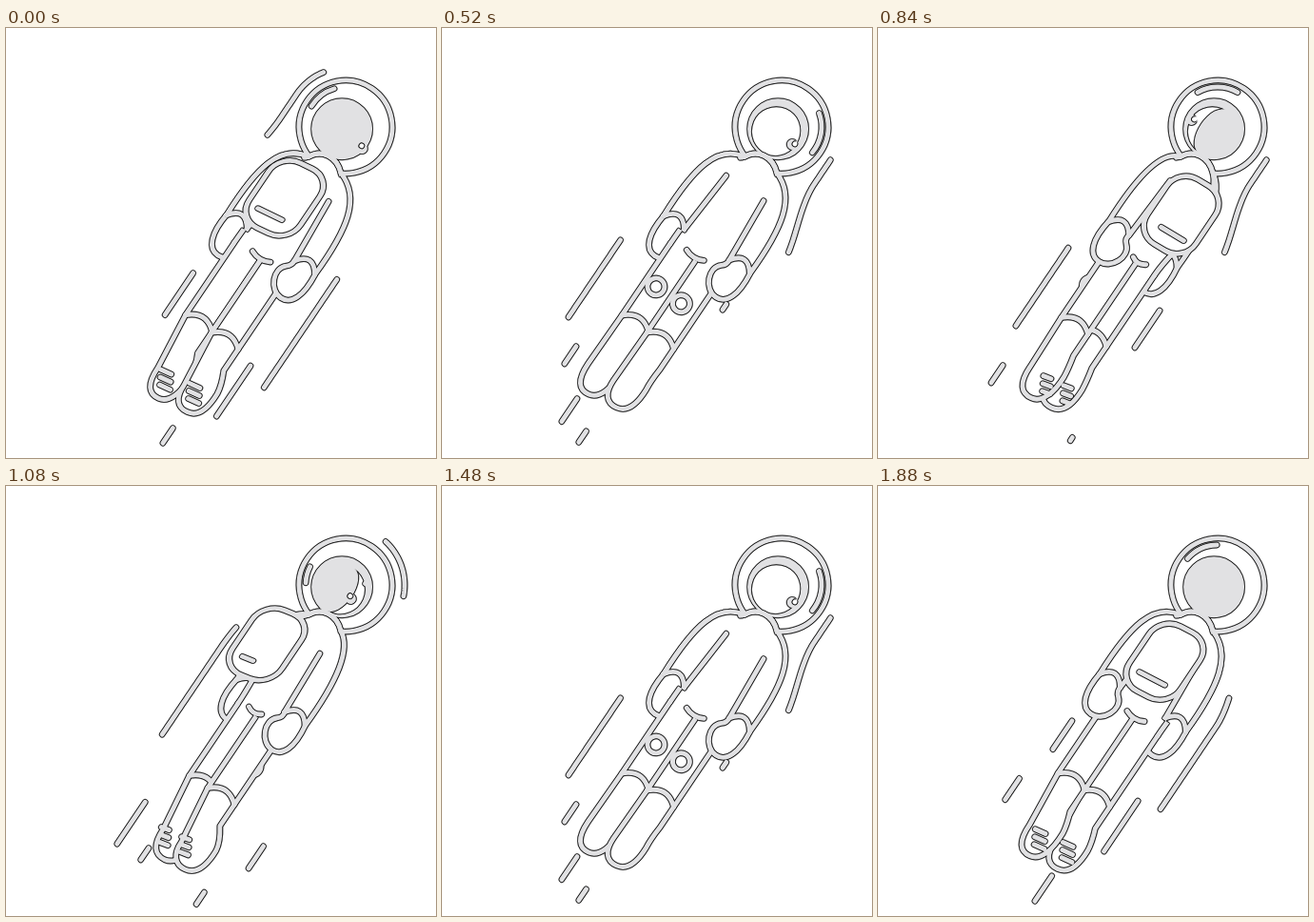
Write an HTML page with a canvas that moves like this. It is 452x452 px and loops after 1.92 s.

```html
<!DOCTYPE html>
<html lang="en">
<head>
<meta charset="utf-8">
<title>Spinning astronaut</title>
<style>
  html, body { margin: 0; width: 100%; height: 100%; overflow: hidden; background: #fff; }
  canvas { display: block; width: 452px; height: 452px; }
</style>
</head>
<body>
<canvas id="stage" width="452" height="452"></canvas>
<script>
const SIZE = 452, STEP = 40, TURN = 24, GREY = '#e1e1e3';
const RAD = Math.PI / 180;
const { sin, cos, abs, min, max } = Math;
const out = document.getElementById('stage').getContext('2d');
const layer = () => Object.assign(document.createElement('canvas'), { width: SIZE, height: SIZE }).getContext('2d');
const g = layer(), edge = layer();
const AXIS = 4;

// Streaks wrapping the helmet: side, phase, final distance, end, first step
const wraps = [
  [1, 5, 66, 304, -3], [1, 13, 82, 304, -3], [1, 21, 82, 304, -3],
  [-1, 0.8, 72, 288, -1], [-1, 8.8, 74, 291, -3], [-1, 16.8, 59, 322, -3]
];
// Straight streaks: x, phase, tail at that phase, speed, length, start, end
const dashes = [
  [-47, 0, 217, 30, 53, 204, 372],
  [-50, 7, 162, 25, 34, 155, 334],
  [-47, 21, 334, 28, 50, 204, 356],
  [57.5, 0, 264, 29, 64, 194, 366],
  [56, 21, 356, 28.5, 66, 187, 360],
  [26.5, 0, 364, 20, 45, 351, 383],
  [-17, 7, 385, 18, 47, 345, 389],
  [-18.5, 13, 357, 18, 47, 345, 386],
  [8.5, 13, 380, 18, 45, 352, 394]
];

const since = (p, p0) => ((p - p0 + 36) % TURN) - 12;

function cut(path) {
  g.globalCompositeOperation = 'destination-out';
  g.fill(path);
  g.globalCompositeOperation = 'source-over';
}

function outline(path) {
  cut(path);
  g.stroke(path);
}

function line(...pts) {
  const path = new Path2D();
  pts.forEach(([x, y], i) => i ? path.lineTo(x, y) : path.moveTo(x, y));
  g.stroke(path);
}

function disc(x, y, r) {
  const path = new Path2D();
  path.arc(x, y, r, 0, 7);
  return path;
}

function bow(x0, y0, cx, cy, x1, y1) {
  const path = new Path2D();
  path.moveTo(x0, y0);
  path.quadraticCurveTo(cx, cy, x1, y1);
  g.stroke(path);
}

// Round the helmet for negative y, then out to the final distance
function track(side, far, y) {
  if (y < 0) return [side * 62 * cos(y / 62), 62 * sin(y / 62)];
  const t = min(1, max(0, (y - 30) / 95));
  return [side * (62 + (far - 62) * t * t * (3 - 2 * t)), y];
}

function streaks(p) {
  for (const [side, p0, far, end, first] of wraps) {
    const d = since(p, p0), tail = 46 * d;
    const a = max(-88, tail);
    const b = min(end, tail + min(137, 105 + 19 * d), 250 + 10 * d);
    if (d < first || a >= b) continue;
    const pts = [];
    for (let i = 0; i <= 40; i++) pts.push(track(side, far, a + (b - a) * i / 40));
    line(...pts);
  }
  for (const [x, p0, tail, speed, len, start, end] of dashes) {
    const y = tail + speed * since(p, p0);
    const a = max(start, y), b = min(end, y + len);
    if (a < b) line([x, a], [x, b]);
  }
}

function shine(p) {
  const d = since(p, 17);
  const len = d > 4 ? max(0, 60 - 6 * (d - 4)) : min(60, 60 + 10 * (d + 5));
  if (len < 8 || d > 11) return;
  const mid = (10 - 12.5 * (d + 4) - 34) * RAD, half = len / 2 * RAD;
  const path = new Path2D();
  path.arc(0, 0, 42, mid - half, mid + half);
  g.stroke(path);
}

function head(a) {
  const y = 7, r = 26.5, c = cos(a), s = sin(a) >= 0 ? 1 : -1;
  g.fill(disc(-2, 4, 32));
  // The face shows as a lit phase of a sphere
  const face = new Path2D();
  face.ellipse(-2, y, r, r, 0, -Math.PI / 2, Math.PI / 2, s < 0);
  face.ellipse(-2, y, r * (c > 0 ? 0.75 * c : -c), r, 0, Math.PI / 2, -Math.PI / 2, (c > 0) === (s > 0));
  if (c < 0.85) cut(face);
  for (const side of [1, -1]) {
    const x = 27 * side * cos(a + 22 * RAD), z = side * sin(a + 22 * RAD);
    if (z < 0.2) continue;
    g.fill(disc(x + 2 * s, 9, 5.5));
    cut(disc(x, 7, 3.4));
    if (z > 0.7) g.fill(disc(x + 6 * s, -13, 2.8));
  }
}

function knee(x) {
  outline(disc(x, 213, 9));
}

function leg(side, a) {
  const x = AXIS + 16.5 * side * cos(a), w = 16.5;
  const foot = x + 4.5 + 6 * sin(a + 35 * RAD);
  const fw = 16.5 + 6 * sin(a) ** 6;
  const base = 344 - 0.15 * (x - AXIS);
  const kx = x + 14 * sin(a);
  if (cos(a) > 0) knee(kx);
  const path = new Path2D();
  path.moveTo(x - w, 166);
  path.lineTo(x - w, 258);
  path.lineTo(foot - fw - 1, 320);
  path.bezierCurveTo(foot - fw - 1, base - 6, foot - 11, base + 2, foot + 1, base);
  path.bezierCurveTo(foot + 13, base - 2, foot + fw + 1, 328, foot + fw, 308);
  path.quadraticCurveTo(foot + fw - 1, 298, x + w, 284);
  path.lineTo(x + w, 166);
  outline(path);
  bow(x - w, 258, x, 242, x + w, 257);
  if (cos(a) <= 0) knee(kx);
  if (cos(a) > 0.4) {
    const half = 6 * cos(a);
    for (let i = 0; i < 3; i++) {
      const bx = x + 4 * i - 9 * sin(a), by = 319 + 7 * i - 0.15 * (x + 12);
      line([bx - half, by + 1], [bx + half, by - 1]);
    }
  }
}

function arm(side, a) {
  const c = side * cos(a), s = c >= 0 ? 1 : -1;
  const x = AXIS + 43 * c, hx = AXIS + 39 * c, w = 13;
  const [nx, ny] = s < 0 ? [-15, 48] : [23, 43];
  const path = new Path2D();
  path.moveTo(nx, ny);
  path.bezierCurveTo(x + s * 8, 53, x + s * 15, 88, x + s * w, 146);
  path.bezierCurveTo(hx + s * 20, 172, hx + s * 14, 187, hx + s, 187);
  path.bezierCurveTo(hx - s * 14, 187, hx - s * 24, 165, hx - s * 13, 156);
  path.quadraticCurveTo(hx - s * 8, 152, x - s * w, 146);
  path.lineTo(x - s * (w + 5 * abs(c)), 75);
  outline(path);
  bow(x - w, 147, x, 128, x + w, 147);
}

function upperArm(side, a) {
  g.save();
  g.beginPath();
  g.rect(-100, 0, 200, 149);
  g.clip();
  arm(side, a);
  g.restore();
}

function neckline(path) {
  path.bezierCurveTo(-8, 33, 10, 31, 23, 43);
}

function torso(a) {
  const hip = 16.5 * abs(cos(a)) + 16.5;
  const l = AXIS - hip, r = AXIS + hip;
  const body = new Path2D();
  body.moveTo(l, 167);
  body.bezierCurveTo(l, 140, -27, 130, -27, 105);
  body.bezierCurveTo(-27, 75, -26, 58, -15, 48);
  neckline(body);
  body.bezierCurveTo(36, 55, 39, 75, 39, 100);
  body.bezierCurveTo(39, 130, r, 140, r, 167);
  outline(body);
  if (abs(cos(a)) > 0.3) {
    const m = 3 - 11 * sin(a) * Math.sign(cos(a)), h = 11 * abs(cos(a));
    bow(m - h, 163, m, 168, m + h, 162);
  }
}

function pack(a) {
  const t = a + 22 * RAD;
  const w = 26 + 4 * abs(cos(t));
  g.save();
  g.translate(AXIS - 41 * sin(t), 98);
  g.transform(1, -0.1 - 0.12 * sin(t), 0, 1, 0, 0);
  const box = new Path2D();
  box.roundRect(-w, -41, 2 * w, 82, 23);
  outline(box);
  if (cos(t) > 0.1 && cos(a) > 0.2) {
    const m = -9 * sin(t), h = 15 * cos(t);
    line([m - h, 22], [m + h, 22]);
  }
  g.restore();
}

function figure(p) {
  const a = p * 15 * RAD;
  const near = sin(a) >= 0 ? 1 : -1;
  streaks(p);
  g.stroke(disc(0, 0, 49));
  shine(p);
  head(a);
  arm(-near, a);
  leg(-near, a);
  leg(near, a);
  const behind = cos(a) <= 0.2;
  if (behind && cos(a) > -0.8) pack(a);
  torso(a);
  if (abs(sin(a)) < 0.5) upperArm(-near, a);
  arm(near, a);
  if (!behind) pack(a);
  // Collar stays on top of the shoulders
  const collar = new Path2D();
  collar.moveTo(-18, 51);
  collar.lineTo(-15, 48);
  neckline(collar);
  g.stroke(collar);
}

function draw(p) {
  g.setTransform(1, 0, 0, 1, 0, 0);
  g.clearRect(0, 0, SIZE, SIZE);
  g.translate(357, 104);
  g.rotate(34 * RAD);
  g.strokeStyle = g.fillStyle = GREY;
  g.lineWidth = 4.9;
  g.lineCap = g.lineJoin = 'round';
  figure(p);

  edge.globalCompositeOperation = 'copy';
  edge.drawImage(g.canvas, 0, 0);
  edge.globalCompositeOperation = 'source-in';
  edge.fillStyle = '#000';
  edge.fillRect(0, 0, SIZE, SIZE);

  out.fillStyle = '#fff';
  out.fillRect(0, 0, SIZE, SIZE);
  for (let i = 0; i < 8; i++) {
    out.drawImage(edge.canvas, 0.5 * cos(i * Math.PI / 4), 0.5 * sin(i * Math.PI / 4));
  }
  out.drawImage(g.canvas, 0, 0);
}

let shown = -1;
const start = performance.now();
function tick() {
  const p = Math.floor((performance.now() - start) / STEP) % TURN;
  if (p !== shown) draw(shown = p);
  requestAnimationFrame(tick);
}
tick();
</script>
</body>
</html>
```
